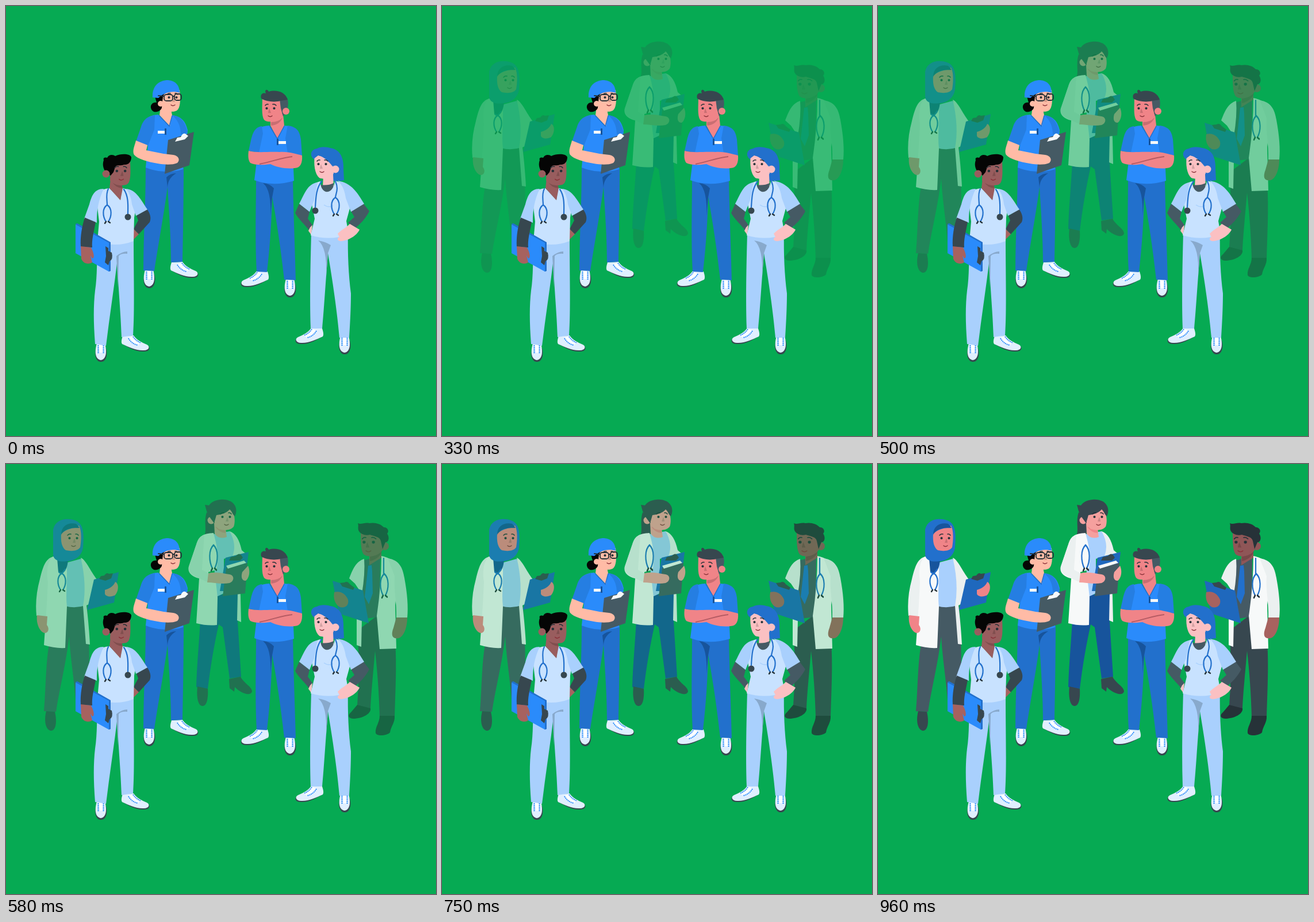
These frames come from a looping animation (748 px wide and 748 px high, 1000 ms). An HTML page:

```html
<!DOCTYPE html>
<html lang="en">
<head>
<meta charset="utf-8">
<title>Medical team</title>
<style>
html,body{margin:0;width:100%;height:100%;overflow:hidden;background:#06aa53}
svg{display:block;width:100%;height:100%}
.blue{fill:#2a8bfb}.mid{fill:#257ee2}.royal{fill:#2270cc}.board{fill:#1f68bd}.navy{fill:#17549c}
.sky{fill:#a9d0fd}.pale{fill:#c8e2ff}.white{fill:#f7f9f9}.grey{fill:#ebf0f0}.shoe{fill:#e0efff}
.slate{fill:#455a64}.dark{fill:#37474f}.ink{fill:#263238}.black{fill:#050505}
.rose{fill:#f08488}.blush{fill:#f5a09e}.peach{fill:#ffbba6}.pink{fill:#fbc0c2}
.brown{fill:#995d5e}.umber{fill:#8f5657}.tan{fill:#a7625f}.shade{fill:#000;opacity:.16}
.tube,.line{fill:none;stroke:#2270cc;stroke-width:2.2;stroke-linecap:round}
.line{stroke:#263238;stroke-width:1.5}
.mouth{stroke:#8a3038;stroke-width:1.3}
.neck{stroke-width:1.5}
.frame{stroke-width:1.8}
.lace{fill:none;stroke:#2a8bfb;stroke-width:2;stroke-dasharray:2 1}
.fold{fill:#88a9cc}
</style>
</head>
<body>
<svg viewBox="0 0 748 748">
<defs>
  <g id="face">
    <circle class="ink" cx="-6.500" r="2.100"/><circle class="ink" cx="6.500" r="2.100"/>
    <path class="line" d="M-10-5Q-7-8-4-7M4-7Q7-8 9-5"/>
    <path class="shade" d="M2 0Q4 6 4 8L-1 8Z"/>
    <path class="line mouth" d="M-3 13Q0 16 4 13"/>
  </g>
  <g id="scope">
    <path class="tube" d="M0 0C-9 6-8 20-2 29M0 0C9 6 8 20 2 29"/>
    <path class="line" style="stroke-width:2.4" d="M-2 29L-4 32M2 29L5 31"/>
  </g>
  <g id="toe">
    <path class="dark" d="M2 8C-2 18 1 32 10 32C20 32 22 18 19 8Z"/>
    <path class="shoe" d="M3 0C0 10-2 27 10 29C21 27 20 11 17 0Z"/>
    <path fill="#fff" d="M6 1H14L13 16H8Z"/>
    <path class="lace" d="M5.500 3V17M14.500 3V17"/>
  </g>
  <g id="side">
    <path class="dark" d="M0 15C12 22 24 30 39 29C48 29 50 24 47 20Z"/>
    <path class="shoe" d="M2 2C0 8-1 13 1 16C12 21 26 28 39 27C48 27 50 20 44 17C35 13 26 9 21 1Z"/>
    <path fill="#fff" d="M12 5L21 2Q25 11 34 14L27 18Q17 15 12 5Z"/>
    <path class="lace" d="M12 6Q17 15 28 18M20 3Q25 11 34 14"/>
  </g>
</defs>

<g id="doctors" opacity="0">
  <!-- doctor with headscarf -->
  <g>
    <path class="slate" d="M104 246L140 243C145 280 145 330 145 428L122 428C121 390 112 340 110 300C104 350 92 395 87 431L66 430C69 400 69 345 75 314Z"/>
    <path class="dark" d="M70 430C66 445 68 462 78 464C87 464 89 448 85 431Z"/>
    <path class="sky" d="M104 172L130 165C140 182 142 205 137 222L138 246Q120 252 103 247Z"/>
    <path class="grey" d="M130 163C140 167 148 190 161 204L152 212L148 242L140 246C143 270 145 295 146 314L139 313L134 247Q141 210 130 163Z"/>
    <path class="grey" d="M82 161C68 165 64 180 59 200C53 222 51 242 53 264L73 266L78 225Z"/>
    <path class="white" d="M82 161C73 167 70 185 73 205L71 245L66 315Q85 321 103 320L106 248C103 225 108 195 105 165Z"/>
    <path class="rose" d="M54 263C52 278 59 292 67 294C74 294 76 286 71 280L72 265Z"/>
    <path class="board" d="M153 201L196 188L188 241L141 254Z"/>
    <path class="dark" d="M162 200L165 195L171 194Q175 188 179 191L186 190L183 199L173 203Z"/>
    <path class="rose" d="M172 219C181 217 188 211 190 205C197 208 196 221 190 228C183 232 174 231 172 226Z"/>
    <path class="navy" d="M89 164L108 167C107 177 105 186 98 190L91 188Z"/>
    <path class="royal" d="M82 114C86 96 105 93 120 98C135 103 136 120 134 145C132 161 118 169 106 169C94 171 83 168 82 158Z"/>
    <path class="rose" d="M96 121C108 111 120 112 127 107C132 116 131 134 129 145C124 152 113 152 104 150C97 145 95 135 96 121Z"/>
    <path class="navy" d="M96 123C96 108 108 101 122 104L128 111C118 112 105 109 96 123Z"/>
    <use href="#face" x="117" y="129"/>
    <path class="tube" d="M92 188L96 191M103 183L97 191"/>
    <use href="#scope" x="97" y="190"/>
  </g>
  <!-- doctor with ponytail -->
  <g>
    <path class="navy" d="M366 228L405 224L403 275L409 370L389 373L377 284L370 279C362 315 356 350 351 391L331 388C332 350 336 310 338 272Z"/>
    <path class="dark" d="M333 387L351 391C352 406 350 421 342 421C334 421 331 405 333 387ZM388 374L408 370C414 382 428 387 428 396C425 404 410 400 398 388L397 396L389 390Z"/>
    <path class="dark" d="M349 84C344 100 349 112 346 122L362 124L366 94Z"/>
    <path class="sky" d="M361 122L389 117C399 126 404 140 402 158L379 165L379 225L364 232Z"/>
    <path class="grey" d="M389 117C400 121 406 132 410 150L416 155L403 165L408 230L409 275L402 272L403 226L394 160Q402 140 389 117Z"/>
    <path class="white" d="M361 120C342 121 335 126 331 140L318 178C315 188 323 196 336 199L331 277Q350 282 367 280L368 232L365 205L353 206L352 188L366 184C372 160 366 140 361 120Z"/>
    <path class="grey" d="M345 123C335 126 332 138 329 146L318 179C317 190 326 195 350 205L352 190L341 184Z"/>
    <path class="blush" d="M362 102L363 121Q370 132 384 127L382 112Z"/>
    <path class="rose" d="M364 109L382 115L382 120Q370 119 364 109Z"/>
    <path class="blush" d="M363 85L389 72C399 85 399 102 396 109C390 116 380 116 370 113L363 106Z"/>
    <circle class="blush" cx="357" cy="98" r="6.500"/>
    <path class="dark" d="M346 71L353 72C360 61 380 59 391 65C402 72 402 83 398 91C393 86 393 82 389 79C383 86 373 88 366 89L362 103L354 92L349 82Z"/>
    <use href="#face" x="383" y="92"/>
    <path class="board" d="M382 163L422 153L414 222L372 221Z"/>
    <path class="dark" d="M388 168L391 162L400 160Q405 154 409 158L412 163L407 168Z"/>
    <path class="slate" d="M383 181L420 172L416 225L377 230Z"/>
    <path class="white" d="M383 177L414 168L418 172L386 182Z"/>
    <path class="blush" d="M352 190C364 187 376 190 389 192C398 194 397 204 389 207C375 210 362 206 350 206ZM411 188L421 177C426 188 422 200 417 203C409 203 409 195 411 188Z"/>
    <use href="#scope" transform="translate(361 141) scale(1 1.4)"/>
  </g>
  <!-- doctor with tie -->
  <g>
    <path class="dark" d="M611 290L648 262L677 310C680 350 677 400 676 440L650 440C649 400 646 360 642 325C639 360 635 400 634 426L611 422C613 390 616 350 611 290Z"/>
    <path class="ink" d="M611 419L634 425C636 434 620 443 604 443C594 442 595 436 600 432ZM650 438L676 438C677 450 669 457 668 467C662 473 645 474 643 468C642 457 650 450 650 438Z"/>
    <path class="slate" d="M621 168L651 160L650 266L615 270Z"/>
    <path class="white" d="M610 270L619 270L618 318L610 315Z"/>
    <path class="grey" d="M623 165C608 170 603 184 597 199L607 208L619 226Q625 190 623 165Z"/>
    <path class="white" d="M653 160C672 164 682 172 684 195L677 245L679 321L650 322L645 264Q653 210 653 160Z"/>
    <path class="grey" d="M664 164C684 167 690 180 693 198C698 225 700 248 698 268L679 268C680 240 674 220 676 195Z"/>
    <path class="royal" d="M630 177L636 176L637 187L638 225L631 244L624 231Z"/>
    <path class="board" d="M568 203L621 220L631 277L579 260Z"/>
    <path class="dark" d="M581 207L589 206Q594 203 598 209L606 215L604 219L585 213Z"/>
    <path class="tan" d="M571 223C582 220 591 226 595 236C597 246 590 251 581 249C572 244 569 234 571 223ZM679 267L698 267C698 282 693 300 683 303C672 305 669 298 674 285Z"/>
    <path class="umber" d="M632 155L632 176L653 163L653 149Z"/>
    <path class="shade" d="M633 161Q647 159 654 151L652 157Q644 167 633 169Z"/>
    <path class="umber" d="M617 115L655 115L655 150C648 160 630 164 622 157C617 150 617 135 617 115Z"/>
    <circle class="umber" cx="659" cy="143" r="7"/>
    <path class="ink" d="M612 103C618 106 624 101 632 103C641 101 652 104 657 110C664 110 667 117 663 121C668 128 665 137 660 136L655 148L652 134C650 126 641 126 633 123C625 125 617 122 614 117C611 112 614 108 612 103Z"/>
    <use href="#face" transform="translate(631 136) scale(-1.25 1.15)"/>
    <use href="#scope" transform="translate(658 191) scale(1 1.3)"/>
    <path class="tube" d="M657 164V191"/>
  </g>
</g>

<!-- nurse with cap -->
<g>
  <use href="#toe" x="239" y="459"/><use href="#side" x="286" y="444"/>
  <path class="royal" d="M243 280L309 282C309 330 308 400 307 445L287 446C287 400 283 350 281 315C275 360 264 420 258 461L239 460C239 400 243 340 243 280Z"/>
  <path class="navy" d="M296 291Q286 291 279 298L281 316Q281 300 296 291Z"/>
  <path class="blue" d="M265 189C248 190 241 196 241 208L247 240L243 281Q275 294 308 284L316 216C312 199 304 192 289 190L284 208Z"/>
  <path class="mid" d="M259 190C244 192 238 200 235 210L226 236L247 243L258 215ZM289 190C305 191 312 204 316 220L304 224Q304 202 289 190Z"/>
  <path class="peach" d="M269 174L267 190L285 209L289 190L287 180Z"/>
  <path class="tube neck" d="M267 191L284 209L289 191"/>
  <path class="black" d="M258 154L275 152L272 174C270 186 254 188 252 177C251 171 256 167 262 168Z"/>
  <path class="peach" d="M274 146L302 146C304 165 303 178 297 182C288 186 277 183 271 177Z"/>
  <circle class="peach" cx="269" cy="170" r="5"/>
  <path class="black" d="M264 154L280 149Q273 153 272 163L266 162Z"/>
  <path class="blue" d="M255 159C254 139 266 129 282 129C296 130 302 139 302 151C289 147 276 150 265 160Z"/>
  <use href="#face" transform="translate(290 159)"/>
  <g class="line frame"><rect x="275" y="154" width="15" height="11" rx="4"/><rect x="293" y="153" width="12" height="11" rx="4"/><path d="M265 156L275 157M290 157H293"/></g>
  <rect class="white" x="264" y="217" width="12" height="5"/><rect class="navy" x="276" y="213" width="3" height="11"/>
  <path class="slate" d="M282 233L327 219L319 277L276 292Z"/>
  <path class="white" d="M294 236L298 229L304 228Q308 219 313 223L317 226L311 232Z"/>
  <path class="peach" d="M226 234L246 242L244 251L274 257L291 259C301 261 303 268 298 273C289 277 275 276 264 274C246 271 229 266 223 259C219 252 224 243 226 234Z"/>
</g>

<!-- man with folded arms -->
<g>
  <use href="#toe" x="484" y="475"/><use href="#side" transform="translate(457 460) scale(-1 1)"/>
  <path class="royal" d="M435 300L499 300C500 360 503 430 504 477L484 476C478 420 470 370 463 332C462 380 458 430 454 463L436 462C433 400 435 350 435 300Z"/>
  <path class="navy" d="M447 308Q459 309 466 317L463 333L460 365Q462 320 447 308Z"/>
  <path class="blue" d="M458 208C442 209 433 214 431 224L437 262L432 303Q465 315 501 304L499 262L510 225C506 212 496 209 484 208L472 231Z"/>
  <path class="mid" d="M445 209C432 211 429 222 426 234L422 252L440 255L447 222ZM490 208C506 210 511 218 513 232L515 260L490 256L486 230Z"/>
  <path class="rose" d="M460 196L460 208L472 231L484 208L482 188Z"/>
  <path class="shade" d="M461 202Q474 202 481 194Q476 207 461 208Z"/>
  <path class="tube neck" d="M459 209L472 231L484 209"/>
  <path class="rose" d="M446 157L478 157L481 190C474 200 456 205 449 198C444 190 446 175 446 157Z"/>
  <path class="slate" d="M476 162L489 160C493 170 490 182 482 192L478 178Z"/>
  <circle class="rose" cx="487" cy="183" r="6"/>
  <path class="dark" d="M444 161C442 154 446 150 452 152C449 146 454 143 457 149C470 145 486 149 490 163L477 165C467 168 452 166 444 161Z"/>
  <use href="#face" transform="translate(460 178) scale(-1 1)"/>
  <rect class="white" x="474" y="235" width="13" height="5"/><rect class="navy" x="471" y="231" width="3" height="11"/>
  <path class="rose" d="M422 252C438 256 454 253 476 254C493 253 506 258 515 260C516 273 512 282 502 282C486 284 470 280 460 275C446 277 433 277 425 273C421 268 421 260 422 252Z"/>
  <path fill="none" stroke="#b55b63" stroke-width="1.800" d="M441 275C462 271 482 263 498 262"/>
</g>

<!-- nurse with blue board -->
<g>
  <use href="#toe" x="155" y="587"/><use href="#side" x="201" y="572"/>
  <path class="dark" d="M227 365L245 353C251 361 253 369 250 376L231 397L222 388L230 373Z"/>
  <path class="tan" d="M222 388L231 397L222 406Z"/>
  <path class="sky" d="M159 405L222 405C222 470 224 530 221 573L201 576C199 520 194 480 194 440C188 490 180 540 174 591L155 588C152 550 152 520 155 495C159 470 158 440 159 405Z"/>
  <path class="fold" d="M211 427Q202 427 192 435L195 490L196 435Q200 430 211 431Z"/>
  <path class="pale" d="M180 317C165 318 158 325 158 342L162 375L159 409Q190 421 222 409L223 368L228 338C220 322 212 318 202 317L199 337Z"/>
  <path class="sky" d="M170 318C153 318 149 331 145 345L136 370L158 377Q157 345 170 318ZM209 318C226 320 232 333 246 354L226 365L219 345Q217 327 209 318Z"/>
  <path class="brown" d="M182 300L180 317L199 338L203 317L201 309Z"/>
  <path class="shade" d="M184 305L202 311L202 317Q190 316 184 305Z"/>
  <path class="brown" d="M182 272L216 270C217 294 217 308 209 311C198 314 188 311 181 304Z"/>
  <path class="black" d="M170 268C168 263 174 263 176 264C180 257 187 259 190 261C201 256 216 257 218 263C218 271 213 277 205 276C198 279 193 275 190 280L187 289L182 295L172 287C168 279 168 274 170 268Z"/>
  <circle class="brown" cx="174" cy="292" r="6.500"/>
  <use href="#face" transform="translate(200 287) scale(1.1)"/>
  <path class="tube" d="M178 318C173 327 176 338 176 346M205 319C214 332 212 350 212 362"/>
  <use href="#scope" x="176" y="346"/><circle class="dark" cx="212" cy="367" r="5.500"/>
  <path class="royal" d="M121 379L124 378L182 411L182 461L179 462Z"/>
  <path class="blue" d="M121 380L179 412V462L121 430Z"/>
  <path class="dark" d="M173 418L178 421V426L184 429Q187 441 180 444L178 451L172 446L174 435Z"/>
  <path class="dark" d="M137 368L156 376C152 396 149 407 150 420L130 419C129 400 132 384 137 368Z"/>
  <path class="tan" d="M130 418L148 420C154 432 154 439 150 439L147 434L150 446C142 451 134 447 131 440Z"/>
</g>

<!-- nurse with blue hair -->
<g>
  <use href="#toe" x="579" y="574"/><use href="#side" transform="translate(552 559) scale(-1 1)"/>
  <path class="sky" d="M531 394L595 394C594 430 596 470 600 500C600 530 598 560 597 577L580 577C575 520 565 460 560 430C556 480 553 530 550 561L530 561C528 500 530 440 531 394Z"/>
  <path class="fold" d="M543 408Q556 410 565 416L560 430L557 470Q559 420 543 408Z"/>
  <path class="royal" d="M538 268C528 263 528 250 541 248C547 244 558 245 564 247C581 249 588 264 587 284L588 303Q570 307 553 301Z"/>
  <path class="slate" d="M510 344L528 358L525 370L533 381L528 391C520 380 508 370 503 360ZM600 357L622 344L632 357C625 371 615 380 607 387L595 377L606 367Z"/>
  <path class="pink" d="M529 385L533 381L531 398L526 391Z"/>
  <path class="pink" d="M552 296L551 314H570L569 293Z"/>
  <path class="slate" d="M547 311Q560 313 570 308L568 325H551Z"/>
  <path class="pale" d="M547 305C530 308 526 322 532 345L537 370L530 399Q565 409 596 397L592 374L600 345C603 322 595 309 572 304C571 318 563 325 556 323C549 320 547 313 547 305Z"/>
  <path class="sky" d="M542 307C524 309 519 328 510 344L528 358L536 338ZM577 304C602 308 611 325 623 344L600 358L591 334Q588 313 577 304Z"/>
  <path fill="none" stroke="#a9d0fd" stroke-width="1.500" d="M553 346Q562 352 569 347"/>
  <path class="pink" d="M537 260C548 258 560 266 568 274L570 291C566 301 553 302 545 299C537 292 535 276 537 260Z"/>
  <path class="royal" d="M535 266C534 253 548 247 560 250L575 265L568 279C560 268 550 261 543 260Z"/>
  <circle class="pink" cx="573" cy="284" r="6.500"/>
  <use href="#face" transform="translate(550 275) scale(-1 1)"/>
  <path class="tube" d="M549 305C539 318 539 335 538 350M573 305C579 318 574 325 573 333"/>
  <use href="#scope" x="573" y="333"/><circle class="dark" cx="538" cy="356" r="5.500"/>
  <path class="pink" d="M598 379L615 389C610 400 595 408 583 409C575 409 576 403 580 402L577 396C586 387 592 386 598 379Z"/>
</g>
</svg>
<script>
const LOOP = 1000, FPS = 24;
const doctors = document.getElementById('doctors');
// [step, opacity]
const fade = [[0, 0], [8, .215], [12, .45], [14, .575], [16, .68], [20, .88], [23, 1]];

function opacityAt(step) {
  const i = Math.max(1, fade.findIndex(([s]) => s >= step));
  const [s0, a0] = fade[i - 1], [s1, a1] = fade[i];
  return a0 + (a1 - a0) * (step - s0) / (s1 - s0);
}

function draw(ms) {
  const step = Math.min(23, Math.floor(ms % LOOP * FPS / 1000 + .15));
  doctors.setAttribute('opacity', opacityAt(step).toFixed(3));
}

const start = performance.now();
function tick() {
  draw(performance.now() - start);
  requestAnimationFrame(tick);
}
tick();
</script>
</body>
</html>
```
